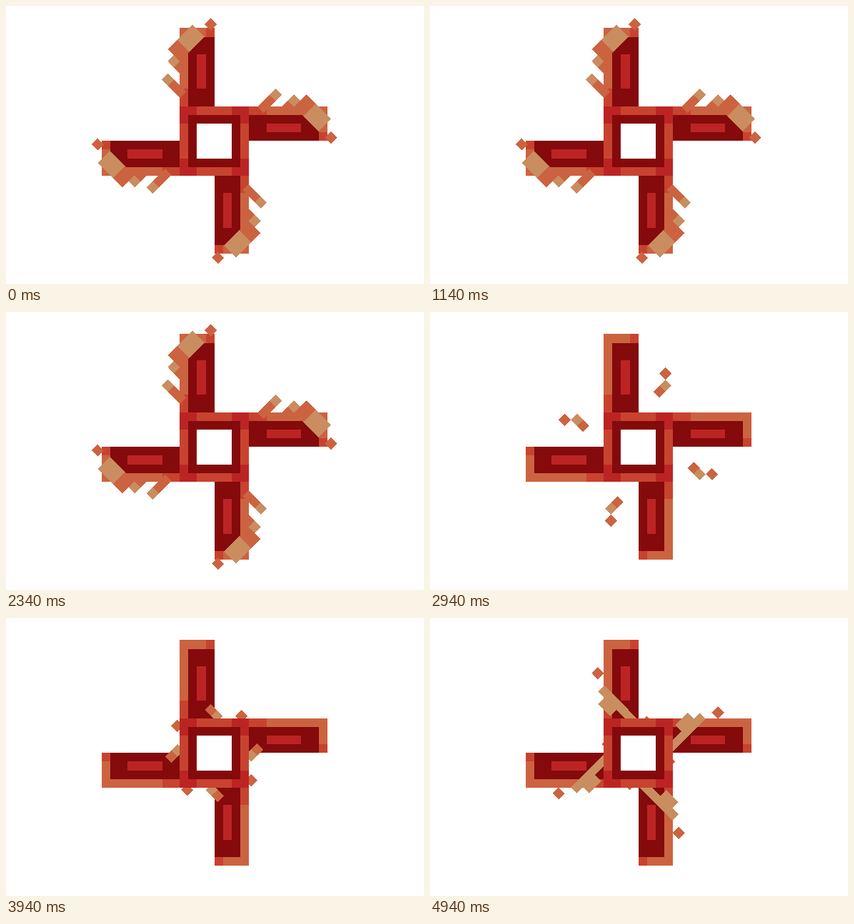
Write an HTML page that moves like this. It is 537 px wide and 357 px high and loops after 5000 ms.

```html
<!DOCTYPE html>
<html lang="en">
<head>
<meta charset="utf-8">
<title>Pinwheel</title>
<style>
  html, body { margin: 0; width: 100%; height: 100%; overflow: hidden; background: #fff; }
  svg { display: block; width: 537px; height: 357px; }
</style>
</head>
<body>
<svg viewBox="0 0 537 357" shape-rendering="crispEdges">
  <g id="arms"></g>
  <g id="sparks"></g>
  <g id="hub"></g>
</svg>
<script>
const TAN = '#c98d60', ORANGE = '#cc6340', RUST = '#c8432f', RED = '#bc2424', DARK = '#840a0c';
const CELL = 11.15, HALF_DIAGONAL = CELL / Math.SQRT2;
const LOOP = 5000, STEP = 200, LEAD = 60;

const layer = id => document.getElementById(id);

const rect = (color, x, y, w, h) =>
  `<rect x="${x}" y="${y}" width="${w}" height="${h}" fill="${color}"/>`;

// A 45° bar from its top corner: `right` cells down-right, `left` cells down-left.
const bar = (color, x, y, right = 1, left = 1) =>
  `<path fill="${color}" d="M${x} ${y}l${right} ${right} ${-left} ${left} ${-right} ${-right}z"/>`;

const fourfold = (shapes, x, y, scale, shift = 0) =>
  [0, 90, 180, 270].map(angle =>
    `<g transform="translate(${x} ${y}) rotate(${angle}) translate(${shift} 0) scale(${scale})">${shapes}</g>`
  ).join('');

const arm =
  rect(ORANGE, -4, -13, 4, 9) +
  rect(RUST, -1, -13, 1, 1) +
  rect(RUST, -4, -6, 1, 2) +
  rect(DARK, -3, -12, 3, 8) +
  rect(RED, -2, -10, 1, 4);

const hubSide =
  rect(RED, -4, -4, 2, 1) +
  rect(RUST, -2, -4, 4, 1) +
  rect(RED, 2, -4, 2, 1) +
  rect(DARK, -3, -3, 6, 1);

const poses = [
  bar(ORANGE, 0, -20) +
  bar(ORANGE, -6, -16, 2) +
  bar(ORANGE, -3, -19, 2, 3) + bar(TAN, -3, -19, 2, 2.5) +
  bar(ORANGE, -6, -14, 2) + bar(TAN, -6, -14) +
  bar(ORANGE, -7, -11, 3) + bar(TAN, -7, -11),

  bar(ORANGE, -6, -14) +
  bar(TAN, -5, -11, 6) +
  bar(TAN, -5, -9, 2) +
  bar(ORANGE, 2, -6),

  bar(ORANGE, 0, -8) + bar(TAN, 1, -7) +
  bar(ORANGE, 5, -7),

  bar(ORANGE, 4, -10) + bar(TAN, 5, -11) +
  bar(ORANGE, 5, -13),

  bar(TAN, 8, -16, 2) + bar(ORANGE, 8, -14) +
  bar(ORANGE, 5, -17),

  bar(TAN, 2, -18, 3) + bar(ORANGE, 3, -15, 2) +
  bar(ORANGE, 3, -19)
].map(pose => fourfold(pose, 267.6, 173.4, HALF_DIAGONAL, -4.5));

layer('arms').innerHTML = fourfold(arm, 267.8, 173.3, CELL);
layer('hub').innerHTML =
  `<g transform="translate(267.8 173.3) scale(${CELL})">${rect('#fff', -4, -4, 8, 8)}</g>` +
  fourfold(hubSide, 267.8, 173.3, CELL);

let shown = -1;
function draw() {
  const time = performance.now() % LOOP;
  const index = Math.floor((time + LEAD) / STEP) % poses.length;
  if (index !== shown) {
    layer('sparks').innerHTML = poses[index];
    shown = index;
  }
  requestAnimationFrame(draw);
}
draw();
</script>
</body>
</html>
```
